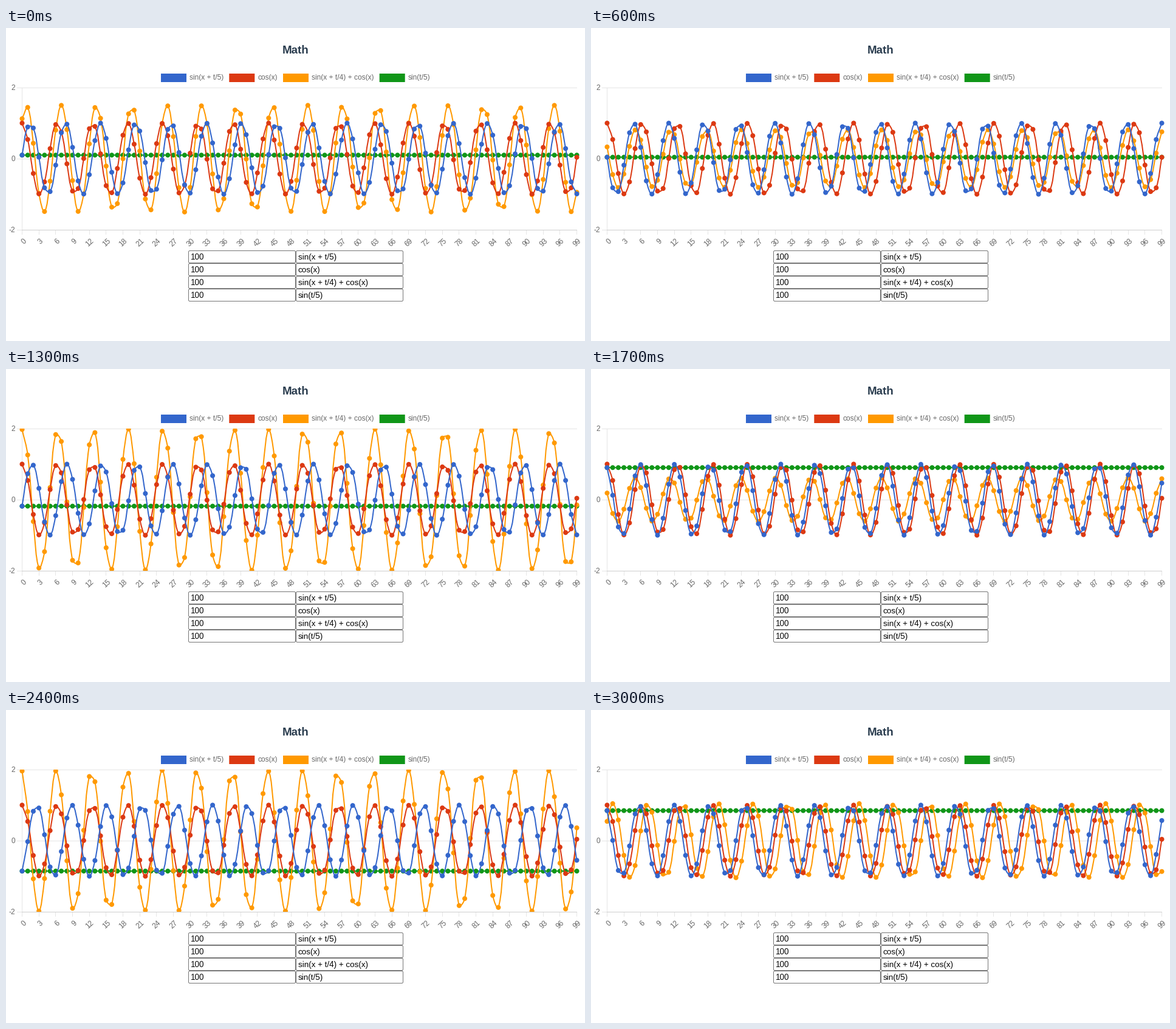
These frames come from a looping animation (953 by 515 pixels, 3100 ms). A matplotlib script:

```python
import numpy as np
import matplotlib.pyplot as plt
from matplotlib.animation import FuncAnimation
from matplotlib.patches import FancyBboxPatch, PathPatch, Rectangle
from matplotlib.path import Path
from matplotlib.transforms import Bbox, TransformedBbox

W, H, DPI = 953, 515, 100
FRAMES, INTERVAL = 31, 100
LEFT, RIGHT, TOP, BOTTOM = 26.5, 939.5, 98, 332
COUNT, TENSION = 100, 0.4
RADIUS = 4

X = np.arange(COUNT)
PX = np.linspace(LEFT, RIGHT, COUNT)

SERIES = [
    ("sin(x + t/5)", "#3366cc", 256.0, lambda x, t: np.sin(x + t / 5)),
    ("cos(x)", "#dc3912", 368.3, lambda x, t: np.cos(x)),
    ("sin(x + t/4) + cos(x)", "#ff9900", 457.0,
     lambda x, t: np.sin(x + t / 4) + np.cos(x)),
    ("sin(t/5)", "#109618", 615.7, lambda x, t: np.sin(t / 5) + 0 * x),
]

# The clock pauses for one tick twice per loop.
CLOCK_FRAMES = [0, 6, 11, 12, 13, 17, 21, 22, 23, 27, 30]
CLOCK_VALUES = [0.5, 15.5, 28, 28, 30.5, 41.5, 52.5, 55.1, 55.1, 65.5, 73.5]

plt.rcParams["font.family"] = "Liberation Sans"
plt.rcParams["text.hinting"] = "default"
plt.rcParams["toolbar"] = "None"

# The tiny margin keeps the pixel size from rounding down.
fig = plt.figure(figsize=((W + 1e-3) / DPI, (H + 1e-3) / DPI), dpi=DPI,
                 facecolor="white")
ax = fig.add_axes([0, 0, 1, 1])
ax.set_xlim(0, W)
ax.set_ylim(H, 0)
ax.axis("off")


def text(x, y, s, px, color, **kw):
    ax.text(x, y, s, fontsize=px * 72 / DPI, color=color,
            **{"va": "baseline", **kw})


def rect(x, y, w, h, color, **kw):
    ax.add_patch(Rectangle((x, y), w, h, facecolor=color, lw=0, **kw))


def to_y(v):
    return (TOP + BOTTOM) / 2 - v * (BOTTOM - TOP) / 4


def spline(pts):
    """Smooth cubic path whose handles stay inside the plot area."""
    prev = np.vstack([pts[:1], pts[:-1]])
    after = np.vstack([pts[1:], pts[-1:]])
    d0 = np.hypot(*(pts - prev).T)
    d1 = np.hypot(*(after - pts).T)
    span = after - prev
    low, high = (LEFT, TOP), (RIGHT, BOTTOM)
    before = np.clip(pts - TENSION * (d0 / (d0 + d1))[:, None] * span, low, high)
    behind = np.clip(pts + TENSION * (d1 / (d0 + d1))[:, None] * span, low, high)
    curves = np.stack([behind[:-1], before[1:], pts[1:]], axis=1).reshape(-1, 2)
    codes = [Path.MOVETO] + [Path.CURVE4] * len(curves)
    return Path(np.vstack([pts[:1], curves]), codes)


DOT = Path.circle((0, 0), RADIUS)


def dots(pts):
    verts = (pts[:, None, :] + DOT.vertices[None]).reshape(-1, 2)
    return Path(verts, np.tile(DOT.codes, len(pts)))


def draw_axes():
    grid = "#e5e5e5"
    for v in (2, 0, -2):
        y = int(to_y(v))
        rect(18, y, RIGHT + 0.5 - 18, 1, grid)
        text(15.5, y + 4, str(v), 12, "#666666", ha="right")
    rect(26, TOP, 1, BOTTOM - TOP, grid)
    rect(26, BOTTOM, 914, 1, "#cecece")

    angle = 42.8
    a, drop = np.radians(angle), 11.3
    for i in range(0, COUNT, 3):
        rect(int(PX[i]), BOTTOM + 1, 1, 7, grid)
        text(PX[i] + drop * np.sin(a), 343 + drop * np.cos(a), str(i), 12,
             "#666666", ha="right", rotation=angle, rotation_mode="anchor")


def draw_legend():
    for name, color, x, _ in SERIES:
        rect(x - 1, 75, 42, 14, color, snap=False)
        text(x + 46, 85, name, 12, "#666666")


def draw_field(x, y, s):
    ax.add_patch(FancyBboxPatch(
        (x + 0.5, y + 0.5), 176, 20, boxstyle="round,pad=0,rounding_size=2",
        facecolor="white", edgecolor="#767676", lw=72 / DPI))
    text(x + 3.5, y + 15, s, 13.333, "black")


text(W / 2 + 0.5, 42, "Math", 18.72, "#2c3e50", ha="center", weight="bold")
draw_axes()
draw_legend()
for row, (name, *_) in enumerate(SERIES):
    draw_field(300, 366 + 21 * row, str(COUNT))
    draw_field(477, 366 + 21 * row, name)

clip = TransformedBbox(Bbox.from_extents(0, BOTTOM, W, TOP), ax.transData)
plots = []
for depth, (_, color, _, fn) in enumerate(reversed(SERIES)):
    empty = Path(np.zeros((1, 2)))
    line = PathPatch(empty, facecolor="none", edgecolor=color,
                     lw=2 * 72 / DPI, capstyle="butt", zorder=10 + 2 * depth)
    marks = PathPatch(empty, facecolor=color, lw=0, zorder=11 + 2 * depth)
    for patch in (line, marks):
        ax.add_patch(patch)
        patch.set_clip_box(clip)
    plots.append((fn, line, marks))


def update(frame):
    t = np.interp(frame, CLOCK_FRAMES, CLOCK_VALUES)
    for fn, line, marks in plots:
        pts = np.column_stack([PX, to_y(fn(X, t))])
        line.set_path(spline(pts))
        marks.set_path(dots(pts))
    return [p for _, line, marks in plots for p in (line, marks)]


anim = FuncAnimation(fig, update, frames=FRAMES, interval=INTERVAL,
                     init_func=lambda: update(0), repeat=True,
                     repeat_delay=0, blit=False)
plt.show()
```
